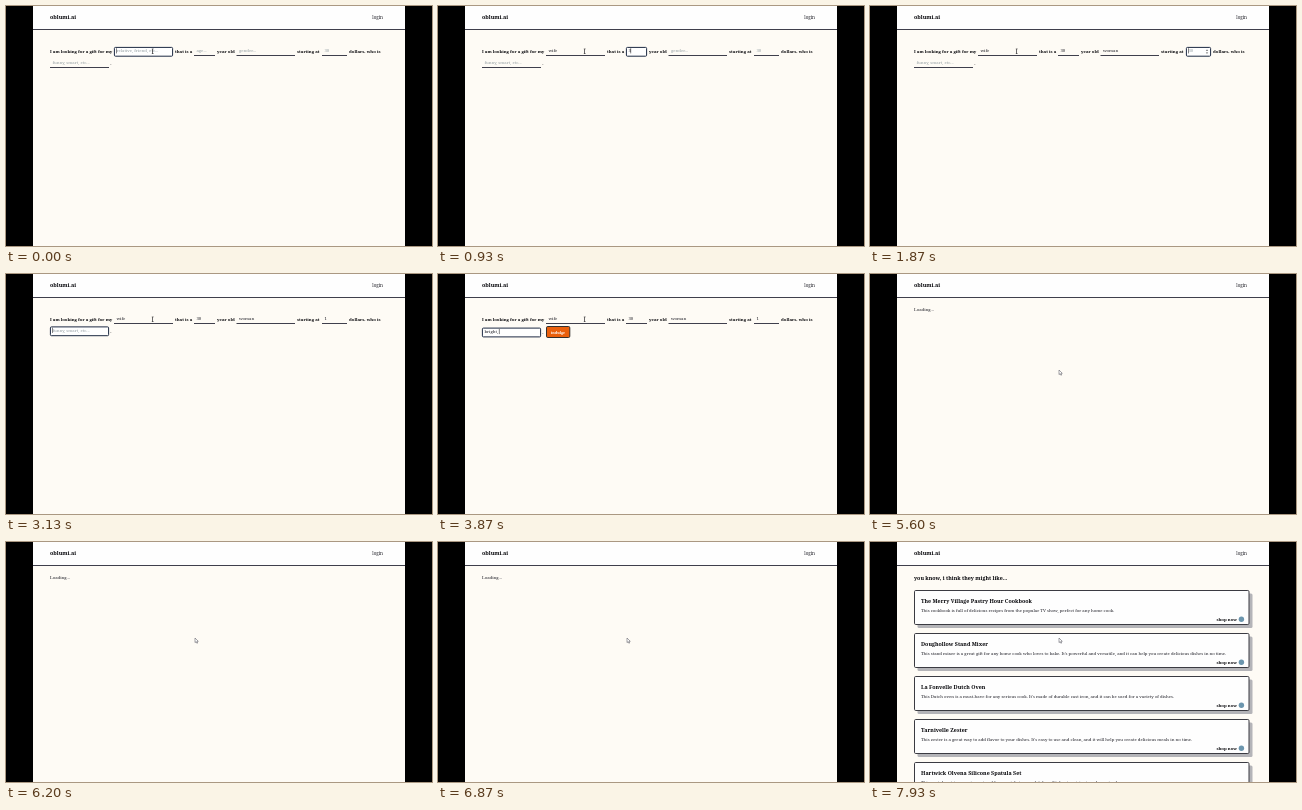
Recreate the animation shown at these times as an HTML page with a canvas. Size 426x240 px, loop 8 s.

```html
<!DOCTYPE html>
<html lang="en">
<head>
<meta charset="utf-8">
<title>Gift finder</title>
<style>
  html, body { margin: 0; width: 100%; height: 100%; overflow: hidden; background: #000; }
  canvas { display: block; width: 100vw; height: 100vh; }
</style>
</head>
<body>
<canvas id="stage"></canvas>
<script>
const W = 426, H = 240, LOOP = 8000;
const SUBMIT = 5300, RESULTS = 7470;
const INK = '#08080c', SOFT = '#202028', RULE = '#3f3f4c', PAGE = '#fefbf5', PALE = '#949fa3';
const BODY = 4.28, BIG = 5.35;

const canvas = document.getElementById('stage');
const ctx = canvas.getContext('2d');
const ratio = window.devicePixelRatio || 1;
canvas.width = W * ratio;
canvas.height = H * ratio;

// Times: focus, first key, and the gap between keys.
const fields = [
  { x: 108, w: 59, hint: 'relative, friend, etc...', value: 'wife', focus: 0, start: 250, step: 90 },
  { x: 188, w: 21, hint: 'age...', value: '30', focus: 750, start: 900, step: 110 },
  { x: 230.5, w: 58.5, hint: 'gender...', value: 'woman', focus: 1150, start: 1250, step: 90 },
  { x: 316, w: 25, hint: '30', value: '1', focus: 1800, start: 2500, step: 90, spinner: true },
  { x: 44, w: 59, hint: 'funny, smart, etc...', value: 'bright, and likes to bake', focus: 2950, start: 3300, step: 75, second: true }
];

const labels = [
  [44, 'I am looking for a gift for my'],
  [169, 'that is a'],
  [211, 'year old'],
  [291, 'starting at'],
  [343, 'dollars, who is']
];

const gifts = [
  ['The Merry Village Pastry Hour Cookbook',
   'This cookbook is full of delicious recipes from the popular TV show, perfect for any home cook.'],
  ['Doughollow Stand Mixer',
   "This stand mixer is a great gift for any home cook who loves to bake. It's powerful and versatile, and it can help you create delicious dishes in no time."],
  ['La Fonvelle Dutch Oven',
   "This Dutch oven is a must-have for any serious cook. It's made of durable cast iron, and it can be used for a variety of dishes."],
  ['Tarnivelle Zester',
   "This zester is a great way to add flavor to your dishes. It's easy to use and clean, and it will help you create delicious meals in no time."],
  ['Hartwick Olvena Silicone Spatula Set',
   "This spatula set is a great way to add some style to your kitchen. It's heat-resistant, and easy to clean."]
];

// Laid out large and scaled down so that letter spacing stays even.
function text(str, x, y, { size = BODY, bold = false, color = INK, align = 'left' } = {}) {
  ctx.save();
  ctx.translate(x, y);
  ctx.scale(size / 32, size / 32);
  ctx.font = `${bold ? 700 : 400} 32px "Noto Serif", serif`;
  ctx.textAlign = align;
  ctx.fillStyle = color;
  ctx.fillText(str, 0, 0);
  const width = ctx.measureText(str).width * size / 32;
  ctx.restore();
  return width;
}

function rect(x, y, w, h, color) {
  ctx.fillStyle = color;
  ctx.fillRect(x, y, w, h);
}

function box(x, y, w, h, r, fill, stroke, line = 1) {
  ctx.beginPath();
  ctx.roundRect(x, y, w, h, r);
  ctx.fillStyle = fill;
  ctx.fill();
  ctx.strokeStyle = stroke;
  ctx.lineWidth = line;
  ctx.stroke();
}

function shape(points, fill) {
  ctx.beginPath();
  points.forEach(([x, y]) => ctx.lineTo(x, y));
  ctx.closePath();
  ctx.fillStyle = fill;
  ctx.fill();
}

function typed(field, t) {
  if (t < field.start) return '';
  return field.value.slice(0, Math.floor((t - field.start) / field.step) + 1);
}

function drawPage() {
  rect(0, 0, W, H, '#000');
  rect(27, 0, 372, H, PAGE);
  rect(27, 0, 372, 23, '#fefefe');
  rect(27, 23, 372, 1, RULE);
  text('oblumi.ai', 44, 13, { size: BIG, bold: true });
  text('login', 377, 12.6, { size: 4.5, align: 'right', color: SOFT });
}

function drawField(field, focused, value, drop) {
  const base = field.second ? 58.5 + drop : 47;
  const { x, w } = field;
  if (focused) box(x + 0.4, base - 5.6, w - 0.8, 8.8, 1, '#fff', '#1c2942');
  else rect(x, Math.round(base + 2), w, 1, RULE);

  const textY = base - 0.8;
  const width = text(value || field.hint, x + 2.4, textY, { color: value ? SOFT : PALE });
  if (!focused) return;
  rect(x + 2.2 + (value ? width : 0), textY - 4, 0.5, 5.2, INK);
  if (field.spinner) {
    const s = x + w - 4;
    shape([[s - 1.2, base - 2.2], [s, base - 3.6], [s + 1.2, base - 2.2]], '#555');
    shape([[s - 1.2, base - 0.6], [s, base + 0.8], [s + 1.2, base - 0.6]], '#555');
  }
}

function drawForm(t) {
  const ready = typed(fields[4], t) !== '';
  const drop = ready ? 1.2 : 0;
  const active = fields.filter(f => f.focus <= t).pop();
  labels.forEach(([x, str]) => text(str, x, 47, { bold: true }));
  fields.forEach(f => drawField(f, f === active, typed(f, t), drop));
  text('.', 104.3, 58.5 + drop, { bold: true });
  if (ready) {
    box(108.5, 52.5, 23.3, 11, 1.3, '#ea5f0c', '#33302e');
    text('indulge', 120.1, 59.5, { size: 3.75, bold: true, color: '#fff', align: 'center' });
  }
}

function drawCard([title, about], y) {
  ctx.beginPath();
  ctx.roundRect(47.5, y + 3.5, 335, 34.5, 1.5);
  ctx.fillStyle = '#b4b4b8';
  ctx.fill();
  box(44.5, y + 0.5, 334.5, 34, 1.2, '#fefefe', '#3b3b42');
  text(title, 51, y + 13, { size: BIG, bold: true });
  text(about, 51, y + 22, { color: SOFT });
  text('shop now', 367, y + 30.7, { bold: true, align: 'right' });
  ctx.beginPath();
  ctx.arc(371.4, y + 29.3, 2.7, 0, Math.PI * 2);
  ctx.fillStyle = '#6c96ae';
  ctx.fill();
}

function drawResults() {
  text('you know, i think they might like...', 44, 38, { size: BIG, bold: true });
  gifts.forEach((gift, i) => drawCard(gift, 48 + i * 43));
}

function drawBeam(x, y) {
  rect(x - 0.3, y - 2.2, 0.6, 4.6, INK);
  rect(x - 0.9, y - 2.6, 1.8, 0.5, INK);
  rect(x - 0.9, y + 2.2, 1.8, 0.5, INK);
}

function drawArrow(x, y) {
  const tip = [[0, 0], [0, 4.6], [1.1, 3.7], [1.9, 5.3], [2.7, 4.9], [1.9, 3.4], [3.3, 3.3]];
  shape(tip.map(([a, b]) => [x + a, y + b]), '#fff');
  ctx.strokeStyle = '#4a4a54';
  ctx.lineWidth = 0.5;
  ctx.stroke();
}

function drawPointer(t) {
  const p = Math.min(1, Math.max(0, (t - 5150) / 350));
  if (p === 0) return drawBeam(146.7, 45.3);
  const ease = p * p * (3 - 2 * p);
  drawArrow(147 + 42 * ease, 45 + 51 * ease);
}

function frame(now) {
  const t = now % LOOP;
  ctx.setTransform(ratio, 0, 0, ratio, 0, 0);
  drawPage();
  if (t < SUBMIT) drawForm(t);
  else if (t < RESULTS) text('Loading...', 44, 37.4, { color: SOFT });
  else drawResults();
  drawPointer(t);
}

const begin = performance.now();
function tick() {
  frame(performance.now() - begin);
  requestAnimationFrame(tick);
}
tick();
</script>
</body>
</html>
```
